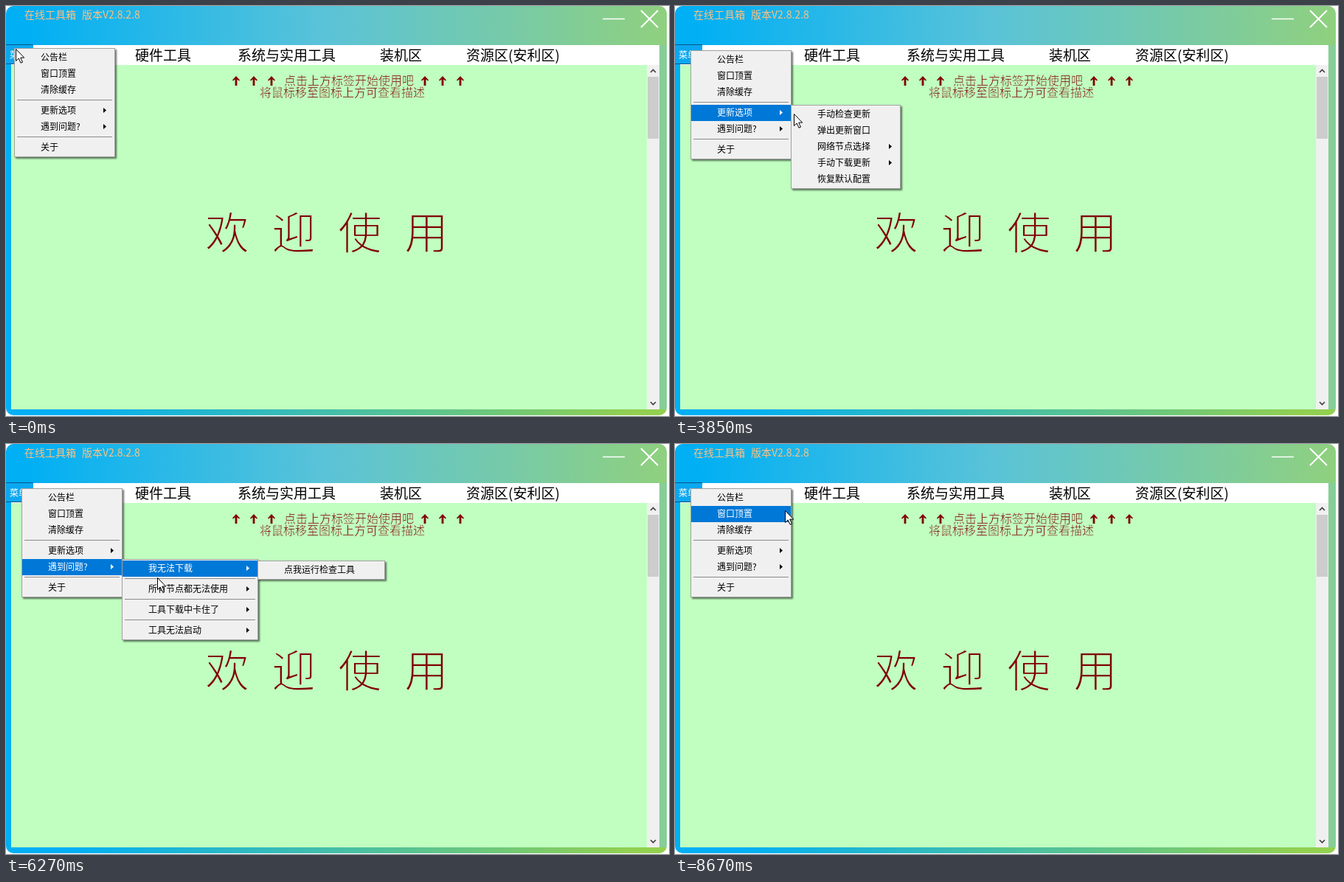
Recreate the animation shown at these times as an HTML page. Size 899 px wide and 556 px high, loop 8.75 s.

```html
<!DOCTYPE html>
<html lang="zh-CN">
<head>
<meta charset="utf-8">
<title>在线工具箱</title>
<style>
html, body { margin: 0; width: 100%; height: 100%; overflow: hidden; background: #fff; }
svg { position: absolute; left: 0; top: 0; font-family: "Noto Sans CJK SC", "Noto Sans", sans-serif; }
text { white-space: pre; }
#win { position: absolute; width: 896px; height: 555px; border-radius: 10px;
  background:
    linear-gradient(90deg, #00aff4 3%, #5ac3d8 48%, #8fd080 99%) 0 0 / 100% 53px no-repeat,
    linear-gradient(90deg, #00aff4 10%, #92d050 95%) 0 100% / 100% 8px no-repeat,
    linear-gradient(90deg, #00aff4 50%, #86ce98 50%); }
.layer { display: none; }
.layer.on { display: inline; }
.menu { filter: drop-shadow(2px 2px 1px rgba(0,0,0,.55)); }
.row rect { fill: none; }
.row.hot rect { fill: #0078d7; }
.row.hot { fill: #fff; }
</style>
</head>
<body>
<div id="win"></div>
<svg id="stage" width="899" height="556" viewBox="0 0 899 556"></svg>
<script>
const LOOP = 8750, STEP = 80;
const maroon = '#800000', mint = '#c0ffc0';
const stage = document.getElementById('stage');

const rect = (x, y, w, h, fill, more = '') =>
  `<rect x="${x}" y="${y}" width="${w}" height="${h}" fill="${fill}" ${more}/>`;
const line = (d, color, width = 1, more = '') =>
  `<path d="${d}" fill="none" stroke="${color}" stroke-width="${width}" ${more}/>`;
// cy is the middle of the glyphs
const label = (str, x, cy, size, fill = '#000', more = '') =>
  `<text x="${x}" y="${cy + size * .38}" font-size="${size}" fill="${fill}" ${more}>${str}</text>`;
// a rim in the panel colour makes the strokes lighter
const thin = (str, x, cy, size, rim) =>
  label(str, x, cy, size, maroon, `stroke="${mint}" stroke-width="${rim}"`);
const chevron = (x, y, dir) =>
  line(`M${x - 3.5} ${y + 2 * dir}l3.5 ${-3.5 * dir}l3.5 ${3.5 * dir}`, '#404040', 1.7);
const layer = (id, body, cls = '') => `<g id="${id}" class="layer ${cls}">${body}</g>`;

function drawWindow() {
  let arrows = '';
  for (let i = 0; i < 3; i++)
    for (const x of [312 + 24 * i, 568 + 24 * i])
      arrows += `<path d="M${x} 95l5 5.500l-1 1l-2.600-2v8.500h-2.800v-8.500l-2.600 2l-1-1z" fill="${maroon}"/>`;
  const welcome = [...'欢迎使用'].map((c, i) => thin(c, 270 + 90 * i, 307, 60, 2)).join('');
  const tabs = [['硬件工具', 175], ['系统与实用工具', 314], ['装机区', 507], ['资源区(安利区)', 624]]
    .map(([s, x]) => label(s, x, 67, 19)).join('');
  return label('在线工具箱', 25, 12, 14, '#ffc080') + label('版本V2.8.2.8', 103, 12, 14, '#ffc080')
    + line('M809 17.5h30', '#fff', 1.5) + line('M861 6l23 23M884 6l-23 23', '#fff', 2)
    + rect(7, 53, 879, 27, '#fff') + tabs
    + rect(7, 80, 862, 467, mint)
    + rect(869, 80, 17, 467, '#f0f0f0') + rect(870, 96, 15, 84, '#cdcdcd')
    + chevron(877.5, 88, 1) + chevron(877.5, 539, -1)
    + arrows
    + thin('点击上方标签开始使用吧', 377, 101, 16, .45)
    + thin('将鼠标移至图标上方可查看描述', 344, 117, 16, .45)
    + welcome
    + rect(0, 52, 37, 27, '#0ba8f0') + line('M0 78.5h37', '#0a5486')
    + line('M0 52.5h37', '#0a5486', 1, 'id="edge"')
    + label('菜单', 5, 66, 12, '#fff');
}

function drawDialog() {
  const news = ['在线工具箱于2022年1月31号上线啦！',
    '本工具箱内的工具均是本作者从网络收集，并且较为常见，好用。后期本作者',
    '会持续更新本软件，加入越来越多有用的工具，也可能会新增更多功能，敬请',
    '期待~~~', '-'.repeat(37), '更新记录：', '2022/2/25 V2.8.2.4', '1.若干小细节改动', '',
    '2022/2/23 V2.8.2.2', '1.网络检测工具改进', '2.增加了3个工具', '',
    '2022/2/21 V2.8.2.0', '1.新增自研网络检测工具', '2.添加了帮助信息'];
  const lines = news.map((s, i) =>
    label(s, 229, 126 + 17 * i, 12, '#008000', s[0] === '-' ? 'letter-spacing=".8"' : '')).join('');
  return rect(212, 45, 470, 464, '#753ac1', 'rx="9"') + rect(222, 84, 450, 415, '#f0f0f0')
    + line('M222.5 48.5h32v26.500h-10l-6 6l-6-6h-10z', '#26183c', 3)
    + line('M228 55.500h21M228 61.500h21M228 67.500h21', '#26183c', 2.5)
    + label('公告栏', 413, 61, 21)
    + rect(636.5, 48.5, 36, 28, '#e3e3e3', 'stroke="#777"') + line('M638 75.500v-26h34', '#fff')
    + label('X', 654.5, 62, 16, '#f00', 'text-anchor="middle"')
    + label('最新公告：', 228, 99, 16)
    + rect(224.5, 115.5, 445, 271, '#f0f0f0', 'stroke="#0078d7"')
    + '<clipPath id="box"><path d="M226 117h425v267h-425z"/></clipPath>'
    + `<g clip-path="url(#box)">${lines}</g>`
    + line('M651.5 117v268M668.5 117v268', '#fff') + rect(652, 134, 15, 65, '#cdcdcd')
    + chevron(659.5, 126, 1) + chevron(659.5, 377, -1)
    + line('M229.5 118v16', '#000')
    + label('上次更新的时间：2022年2月16日 16:59:49', 228, 416, 14) + label('当前版本：2.8.2.8', 508, 416, 14)
    + label('打开时间：2022年3月12日 18:47:50', 268, 448, 14) + label('最新版本：2.8.2.8', 508, 448, 14)
    + label('建议：无需更新', 536, 478, 14, '#f00')
    + label('Node:Tokyo', 231, 488, 10.5);
}

// '-' separator, '#' grey caption, trailing '>' opens a submenu.
// from: parent menu and row; open: time spans on screen
const menus = {
  main: { x: 21, y: 60, w: 137, open: [[0, 570], [2770, LOOP]],
    items: ['公告栏', '窗口顶置', '清除缓存', '-', '更新选项>', '遇到问题?>', '-', '关于'] },
  update: { x: 157, y: 134, w: 149, from: ['main', 3], open: [[3740, 5700]],
    items: ['手动检查更新', '弹出更新窗口', '网络节点选择>', '手动下载更新>', '恢复默认配置'] },
  nodes: { x: 305, y: 180, w: 270, from: ['update', 2], open: [[4550, 4870]],
    items: ['#如果当前网络节点连接缓慢，请您', '#点击以下任意节点进行切换',
      '1.节点1（中国香港）', '2.节点2（日本东京）', '3.节点3（美国洛杉矶）'] },
  links: { x: 305, y: 202, w: 271, from: ['update', 3], open: [[4950, 5500]],
    items: ['#如果本程序自带的更新功能失效，请您', '#点击以下任意网址进入浏览器下载',
      '1.网址1（中国香港1）', '2.网址2（中国香港2）', '3.网址3（日本东京）', '4.网址4（美国洛杉矶1）',
      '5.网址5（美国洛杉矶2）', '6.网址6（美国云岚数据中心）'] },
  help: { x: 157, y: 156, w: 185, from: ['main', 4], open: [[5700, 7510], [8220, 8440]],
    items: ['我无法下载>', '-', '所有节点都无法使用>', '-', '工具下载中卡住了>', '-', '工具无法启动>'] },
  check: { x: 341, y: 158, w: 173, from: ['help', 0], open: [[6110, 6420]],
    items: ['点我运行检查工具'] },
  offline: { x: 341, y: 186, w: 323, from: ['help', 1], open: [[6420, 6750]],
    items: ['请检查网络连接是否正常，或稍后再试一次'] },
  launch: { x: 341, y: 242, w: 250, from: ['help', 3], open: [[6800, 7040]],
    items: ['请关闭杀毒软件后重试', '请以管理员身份运行本程序'] }
};

function drawMenu(id, m) {
  let h = 2, body = '';
  m.tops = [];
  for (const item of m.items) {
    if (item === '-') {
      body += line(`M4 ${h + 2.5}H${m.w - 4}`, '#8c8c8c');
      h += 6;
    } else if (item[0] === '#') {
      body += label(item.slice(1), 34, h + 9, 12, '#6d6d6d');
      h += 18;
    } else {
      body += `<g class="row"><rect x="1" y="${h}" width="${m.w - 2}" height="22"/>`
        + label(item.replace('>', ''), 36, h + 10.5, 12, 'inherit')
        + (item.endsWith('>') ? `<path d="M${m.w - 16} ${h + 7}v7l4-3.500z"/>` : '') + '</g>';
      m.tops.push(h);
      h += 22;
    }
  }
  m.h = h + 2;
  return layer(id, rect(.5, .5, m.w - 1, m.h - 1, '#f0f0f0', 'stroke="#a0a0a0"') + body, 'menu');
}

stage.innerHTML = drawWindow() + layer('dialog', drawDialog())
  + Object.entries(menus).map(([id, m]) => drawMenu(id, m)).join('')
  + '<path id="cursor" d="M.5 .5v16l3.700-3.500l2.800 6.200l2.500-1.100l-2.800-6h5z" fill="#fff" stroke="#000"/>';

const [dialog, cursor, edge] = ['dialog', 'cursor', 'edge'].map(id => document.getElementById(id));
for (const id in menus) {
  menus[id].el = document.getElementById(id);
  menus[id].rows = menus[id].el.querySelectorAll('.row');
}

// time, x, y of the pointer
const path = [
  [0, 13, 58], [160, 13, 58], [490, 34, 63], [800, 182, 89], [955, 343, 96], [1030, 343, 96],
  [1570, 653, 62], [1740, 653, 62], [2250, 93, 72], [2560, 24, 63], [2770, 24, 63],
  [3160, 92, 115], [3740, 142, 146], [4080, 205, 146], [4320, 240, 188], [4950, 264, 209],
  [5350, 266, 211], [5700, 146, 167], [6160, 201, 172], [6240, 205, 181], [6810, 218, 250],
  [7100, 140, 166], [7600, 112, 76], [7760, 121, 85], [8360, 103, 196], [8560, 142, 97], [8640, 149, 90]];

function pointer(t) {
  const i = path.findLastIndex(p => p[0] <= t), a = path[i], b = path[i + 1] || a;
  const k = (t - a[0]) / (b[0] - a[0] || Infinity);
  return [1, 2].map(j => Math.round(a[j] + (b[j] - a[j]) * k));
}

const within = (t, [from, to]) => t >= from && t < to;

function render(now) {
  const t = Math.floor(now % LOOP / STEP) * STEP;
  const first = t < 2000;
  Object.assign(menus.main, first ? { x: 11, y: 57 } : { x: 21, y: 60 });

  // the highlight trails the pointer by one step
  const [px, py] = pointer(Math.max(0, t - STEP));
  const hot = {};
  for (const [id, m] of Object.entries(menus)) {
    m.on = m.open.some(span => within(t, span));
    if (!m.on) continue;
    if (m.from) hot[m.from[0]] ??= m.from[1];
    const x = px - m.x, y = py - m.y;
    if (x > 0 && x < m.w && y > 0 && y < m.h && t > 2 * STEP)
      hot[id] = m.tops.findIndex(top => y >= top && y < top + 22);
  }
  for (const [id, m] of Object.entries(menus)) {
    m.el.classList.toggle('on', m.on);
    m.el.setAttribute('transform', `translate(${m.x} ${m.y})`);
    m.rows.forEach((row, i) => row.classList.toggle('hot', hot[id] === i));
  }
  dialog.classList.toggle('on', within(t, [650, 1740]));
  edge.setAttribute('stroke', menus.main.on ? '#0a5486' : '#d8f0fc');
  cursor.setAttribute('transform', `translate(${pointer(t)})`);
}

const start = performance.now();
function tick() {
  render(performance.now() - start);
  requestAnimationFrame(tick);
}
tick();
</script>
</body>
</html>
```
